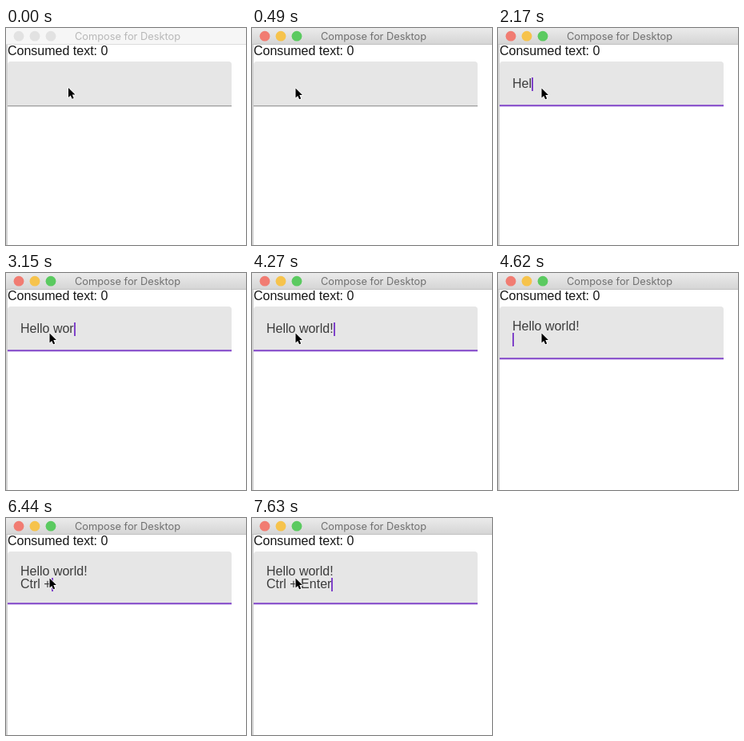
Animation of 300x272 px, one loop 8 s. Source, as an HTML page:

```html
<!DOCTYPE html>
<html lang="en">
<head>
<meta charset="utf-8">
<title>Text field demo</title>
<style>
  html, body { margin: 0; width: 100%; height: 100%; overflow: hidden; background: #fff; }
  #win { position: absolute; left: 0; top: 0; width: 300px; height: 272px; overflow: hidden; background: #fff; }
  #win > * { position: absolute; }
  .edge { left: 0; top: 20px; width: 1px; height: 252px; background: #d2d2d2; border-right: 1px solid #d0d0d0; }
  #bar { left: 0; top: 0; width: 300px; height: 20px; background: #f6f6f6; border-bottom: 1px solid #dcdcdc; }
  #bar.active { background: linear-gradient(#ebebeb, #d5d5d5); border-bottom-color: #c2c2c2; }
  #bar svg { position: absolute; left: 0; top: 0; }
  #bar circle { fill: #e2e2e2; }
  #bar.active circle { fill: var(--c); }
  #title { position: absolute; left: 86px; top: 3px; font: 12.8px/16px Inter, sans-serif; color: #b8b8b8; white-space: pre; }
  #bar.active #title { color: #707070; }
  .text { font: 16px/16px "Liberation Sans", Arial, sans-serif; white-space: pre; }
  .count { left: 2px; top: 21px; color: #161616; }
  #field { left: 2px; top: 42px; width: 280px; background: #e6e6e6; border-radius: 4px 4px 0 0; }
  .row { left: 18px; height: 16px; color: #3c3c3c; }
  #caret { position: absolute; left: 100%; top: 0; width: 2px; height: 17px; background: #7f42c9; }
  .over { left: 0; top: 0; }
</style>
</head>
<body>
<div id="win">
  <div class="edge"></div>
  <div id="bar">
    <svg width="70" height="20">
      <circle cx="16" cy="10.2" r="6.4" style="--c:#f17c72"/>
      <circle cx="36" cy="10.2" r="6.4" style="--c:#f6c34c"/>
      <circle cx="56" cy="10.2" r="6.4" style="--c:#5bca60"/>
    </svg>
    <span id="title">Compose for Desktop</span>
  </div>
  <div class="text count">Consumed text: 0</div>
  <div id="field"></div>
  <svg class="over" width="300" height="272"><rect id="line" x="2" width="280"/></svg>
  <div class="text row"><span></span></div>
  <div class="text row"><span></span></div>
  <svg class="over" width="300" height="272">
    <path id="mouse" d="M0 0V12L2.7 9.5L4.6 13.8L6.7 12.9L4.8 8.6H8.5Z"
      fill="#000" stroke="#fff" stroke-width="1.6" stroke-linejoin="round" paint-order="stroke"/>
  </svg>
</div>
<script>
const LOOP = 8000, STEP = 70;
const $ = id => document.getElementById(id);
const bar = $('bar'), field = $('field'), line = $('line'), mouse = $('mouse');
const rows = [...document.querySelectorAll('.row')];

const message = 'Hello world!\nCtrl + Enter';
// time of each key press, one per character
const keys = [
  1400, 1960, 2100, 2170, 2450, 2590, 2800, 3010, 3150, 3570, 3850, 4270, 4620,
  5390, 5530, 5600, 5670, 6230, 6370, 6580, 6930, 7140, 7280, 7420, 7630
];
// "Hel" is complete by the third press
keys[3] = 2310;
const focusAt = 630;
const blinks = [[1120, 1400], [5040, 5390], [6160, 6230]];

const caret = document.createElement('b');
caret.id = 'caret';

const ramp = (t, a, b) => Math.min(1, Math.max(0, (t - a) / (b - a)));
const ease = p => p * p * (3 - 2 * p);
const mix = (a, b, p) => a + (b - a) * p;

function draw(ms) {
  const t = Math.floor(ms % LOOP / STEP) * STEP;

  const move = ease(ramp(t, 0, 420));
  mouse.setAttribute('transform', `translate(${mix(78, 54.5, move)} ${mix(75, 75.5, move)})`);
  bar.className = t >= 420 ? 'active' : '';

  const typed = message.slice(0, keys.filter(k => k <= t).length).split('\n');
  const double = typed.length > 1;
  const height = double ? 66 : 56;
  field.style.height = height + 'px';

  const focus = ramp(t, 560, 700);
  const tint = [[135, 127], [135, 66], [135, 201]].map(([a, b]) => Math.round(mix(a, b, focus)));
  const weight = mix(1, 2, focus);
  line.setAttribute('y', 42.3 + height - weight);
  line.setAttribute('height', weight);
  line.setAttribute('fill', `rgb(${tint})`);

  rows.forEach((row, i) => {
    row.style.top = (double ? 59 + 16 * i : 62) + 'px';
    row.firstChild.textContent = typed[i] || '';
  });
  rows[typed.length - 1].appendChild(caret);
  const shown = t >= focusAt && !blinks.some(([a, b]) => t >= a && t < b);
  caret.style.visibility = shown ? 'visible' : 'hidden';
}

const start = performance.now();
function tick() {
  draw(performance.now() - start);
  requestAnimationFrame(tick);
}
draw(0);
requestAnimationFrame(tick);
</script>
</body>
</html>
```
